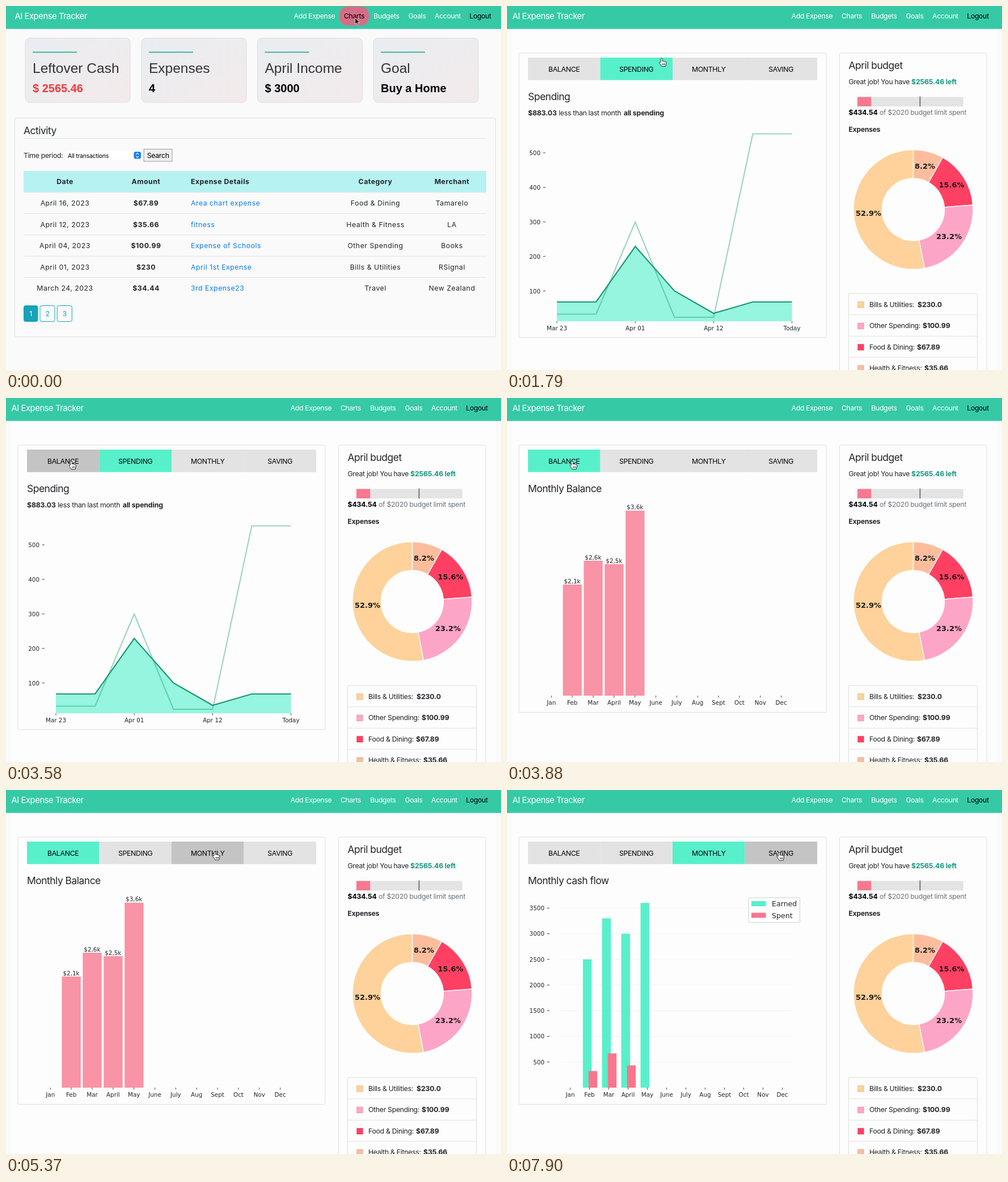
These frames come from a looping animation (873x642 px, 8 s). An HTML page:

```html
<!DOCTYPE html>
<html lang="en">
<head>
<meta charset="utf-8">
<title>AI Expense Tracker</title>
<style>
html, body { margin: 0; width: 100%; height: 100%; overflow: hidden; background: #fafafa; }
svg { display: block; width: 873px; height: 642px; }
text { font: 12.3px Inter, Roboto, sans-serif; letter-spacing: -.025em; fill: #212529; white-space: pre; }
.mid { text-anchor: middle; }
.end { text-anchor: end; }
.b { font-weight: 700; letter-spacing: -.012em; }
.h { font-size: 17.5px; letter-spacing: -.03em; }
.nav text { fill: #fff; letter-spacing: -.03em; }
.nav .brand { font-size: 14.8px; }
.nav .dark, .tab { fill: #000; }
.big { font: 24.5px "Liberation Sans", Arial, sans-serif; letter-spacing: 0; fill: #333; }
.sum { font: bold 20px "Liberation Sans", Arial, sans-serif; letter-spacing: 0; fill: #000; }
.cell { letter-spacing: .5px; }
.link { fill: #0d7bea; }
.plot { font: 10.4px "DejaVu Sans", sans-serif; letter-spacing: 0; }
.key { font: 12.6px "DejaVu Sans", sans-serif; letter-spacing: 0; }
.pct { font: bold 13px "DejaVu Sans", sans-serif; letter-spacing: 0; fill: #1c1a1a; }
.box { fill: none; stroke: #dfdfdf; }
.line { fill: none; stroke: #dee2e6; }
.tick { fill: none; stroke: #333; stroke-width: .9; }
</style>
</head>
<body>
<svg id="stage" viewBox="0 0 873 642"></svg>
<script>
const MINT = '#57f0cb', ROSE = '#f7768d', GREEN = '#1a9873';
const MONTHS = 'Jan Feb Mar April May June July Aug Sept Oct Nov Dec'.split(' ');

const text = (x, y, s, cls = '', extra = '') => `<text x="${x}" y="${y}" class="${cls}" ${extra}>${s.replace(/&/g, '&amp;')}</text>`;
const rect = (x, y, w, h, fill, extra = '') => `<rect x="${x}" y="${y}" width="${w}" height="${h}" fill="${fill}" ${extra}/>`;
const box = (x, y, w, h, r = 2) => `<rect x="${x}" y="${y}" width="${w}" height="${h}" rx="${r}" class="box"/>`;
const path = (d, cls, extra = '') => `<path d="${d}" class="${cls}" ${extra}/>`;
const group = (id, s) => `<g id="${id}">${s}</g>`;
const each = (list, fn) => list.map(fn).join('');

function header() {
  const items = [['Add Expense', 538], ['Charts', 608], ['Budgets', 665], ['Goals', 719], ['Account', 773], ['Logout', 830.5]];
  return rect(0, 0, 873, 40.5, '#36c9a6') + `<g id="nav" class="nav">` +
    rect(582, 1, 52, 33.5, '#d56d87', 'id="pill" rx="14"') +
    text(9.5, 23, 'AI Expense Tracker', 'brand') +
    each(items, ([s, x]) => text(x, 22.4, s, s === 'Logout' ? 'mid dark' : 'mid', `id="${s.replace(' ', '')}"`)) + '</g>';
}

function home() {
  const cards = [[34, 'Leftover Cash', '$ 2565.46'], [239, 'Expenses', '4'], [443.5, 'April Income', '$ 3000'], [648, 'Goal', 'Buy a Home']];
  const rows = [
    ['April 16, 2023', '$67.89', 'Area chart expense', 'Food & Dining', 'Tamarelo'],
    ['April 12, 2023', '$35.66', 'fitness', 'Health & Fitness', 'LA'],
    ['April 04, 2023', '$100.99', 'Expense of Schools', 'Other Spending', 'Books'],
    ['April 01, 2023', '$230', 'April 1st Expense', 'Bills & Utilities', 'RSignal'],
    ['March 24, 2023', '$34.44', '3rd Expense23', 'Travel', 'New Zealand']
  ];
  const cols = [104, 247, 326, 651.5, 786.5];
  const row = (cells, y, head) => each(cells, (s, i) => text(cols[i], y, s,
    (head || i === 1 ? 'b ' : '') + 'cell' + (i === 2 ? (head ? '' : ' link') : ' mid')));
  return each(cards, ([x, name, value], i) =>
      rect(x, 56.5, 185, 113.5, 'url(#card)', 'rx="8" stroke="#dcdde0"') +
      path(`M${x + 13} 81.5h78`, '', 'stroke="#3fb59b" stroke-width="1.8"') +
      text(x + 13, 118, name, 'big') +
      text(x + 13, 151.7, value, 'sum', i ? '' : 'style="fill:#f33a3a"')) +
    box(15.5, 197.5, 848, 386) + text(31, 226, 'Activity', 'h') + path('M31 233.5H847', 'line') +
    text(31, 267.6, 'Time period:') +
    rect(105, 255, 134, 16, '#fff', 'rx="3"') +
    text(109, 267.7, 'All transactions', '', 'style="font-size:10.5px;fill:#000"') +
    rect(225.5, 257, 12.5, 12.5, '#1b7df6', 'rx="3"') +
    path('M229.3 261.8l2.4-2.4 2.4 2.4M229.3 264.8l2.4 2.4 2.4-2.4', '', 'fill="none" stroke="#fff" stroke-width="1.2"') +
    rect(243, 252.5, 50, 21.5, '#efefef', 'stroke="#9a9a9a"') +
    text(268.2, 267.6, 'Search', 'mid', 'style="fill:#000"') +
    rect(31, 291, 816, 37.5, '#b6f2f2') +
    row(['Date', 'Amount', 'Expense Details', 'Category', 'Merchant'], 314.3, true) +
    each(rows, (r, i) => path(`M31 ${328.8 + 37.5 * i}H847`, 'line') + row(r, 352.4 + 37.5 * i)) +
    each([31.5, 60, 90.3], (x, i) => rect(x, 528.5, i ? 26 : 24.5, 28, i ? 'none' : '#17a2b8', 'rx="3" stroke="#17a2b8"') +
      text(x + (i ? 13 : 12.2), 547, `${i + 1}`, 'mid', `style="fill:${i ? '#17a2b8' : '#fff'}"`));
}

function donut() {
  const cx = 716.5, cy = 359, R = 105.5, r = 55;
  const parts = [[8.2, '#fdbd9c', 737, 282], [15.6, '#ff4062', 784, 315.5], [23.2, '#fda5c6', 779.5, 406.5], [53, '#fed29a', 637.5, 365]];
  const at = (p, q) => { const a = p / 50 * Math.PI; return `${cx + q * Math.sin(a)} ${cy - q * Math.cos(a)}`; };
  let sum = 0;
  const slices = each(parts, ([p, fill]) => {
    const a = sum, b = sum += p, big = +(p > 50);
    return path(`M${at(a, R)}A${R} ${R} 0 ${big} 1 ${at(b, R)}L${at(b, r)}A${r} ${r} 0 ${big} 0 ${at(a, r)}Z`, '', `fill="${fill}" stroke="#fdfdfd" stroke-width="1.4"`);
  });
  return slices + each(parts, ([p, , x, y]) => text(x, y + 4.6, (p > 50 ? 52.9 : p) + '%', 'pct mid'));
}

function budget() {
  const list = [['Bills & Utilities:', '$230.0', 724, '#fed29a'], ['Other Spending:', '$100.99', 733, '#fda5c6'],
    ['Food & Dining:', '$67.89', 723, '#ff4062'], ['Health & Fitness:', '$35.66', 736, '#fdbd9c']];
  return box(586.5, 83, 259.5, 600) + text(602.5, 111.3, 'April budget', 'h') +
    text(602.5, 138.3, 'Great job! You have') + text(713, 138.3, '$2565.46 left', 'b', 'style="fill:#17967f"') +
    rect(618, 160.5, 187, 16.5, '#e4e4e4') + rect(618, 160.5, 24.3, 16.5, '#f8788f') + rect(727.7, 159.5, 1.5, 18, '#555') +
    text(602.5, 192, '$434.54', 'b', 'style="fill:#000"') +
    text(657, 192, 'of $2020 budget limit spent', '', 'style="fill:#6c757d"') +
    text(602.5, 222.4, 'Expenses', 'b', 'style="font-size:12px"') + donut() + box(602.5, 507, 227, 180) +
    each(list, ([name, cost, x, fill], i) => {
      const y = 526.3 + 37.5 * i;
      return (i ? path(`M602.5 ${y - 19}H829.5`, 'line') : '') +
        rect(618.5, y - 5, 11, 11, fill, 'stroke="#000" stroke-opacity=".12"') +
        text(639, y + 4.2, name) + text(x, y + 4.2, cost, 'b');
    });
}

const months = (x0, step) => each(MONTHS, (m, i) => {
  const x = x0 + step * i;
  return path(`M${x} 525v3.5`, 'tick') + text(x, 541, m, 'plot mid');
});

function spending() {
  const line = ys => 'M' + ys.map((y, i) => `${88 + 69.1 * i} ${y}`).join('L');
  const now = line([522, 522, 424, 502.5, 542, 522, 522]);
  const last = line([543.5, 543.5, 381, 549, 549, 225.5, 225.5]);
  return box(21, 83, 542, 502) + text(37, 166.4, 'Spending', 'h') +
    text(37, 193.3, '$883.03', 'b') + text(91.2, 193.3, 'less than last month') + text(205.7, 193.3, 'all spending', 'b') +
    each([500, 400, 300, 200, 100], (n, i) => {
      const y = 259 + 60.9 * i;
      return text(59, y + 3.9, `${n}`, 'plot end') + path(`M63.5 ${y}h4.5`, 'tick');
    }) +
    path(`${now}V556H88Z`, '', `fill="${MINT}" fill-opacity=".62"`) +
    path(last, '', `fill="none" stroke="${GREEN}" stroke-opacity=".42" stroke-width="2.1"`) +
    path(now, '', `fill="none" stroke="${GREEN}" stroke-width="2.2"`) +
    each(['Mar 23', 'Apr 01', 'Apr 12', 'Today'], (s, i) => path(`M${88 + 138.2 * i} 556v3.5`, 'tick') + text(88 + 138.2 * i, 571.5, s, 'plot mid'));
}

function balance() {
  const bars = [[329, '$2,1k'], [287, '$2,6k'], [293, '$2,5k'], [198.7, '$3,6k']];
  return box(21, 83, 542, 471.5) + text(37, 166.4, 'Monthly Balance', 'h') +
    each(bars, ([y, s], i) => rect(98.5 + 36.9 * i, y, 33.3, 525 - y, '#f993a6') + text(115 + 36.9 * i, y - 2.5, s, 'plot mid')) +
    months(78.3, 36.85);
}

function monthly() {
  const k = .0905;
  const bar = (x, v, fill) => rect(x, 525 - v * k, 15.4, v * k, fill);
  const keys = [['Earned', MINT], ['Spent', ROSE]];
  return box(21, 83, 542, 471.5) + text(37, 166.4, 'Monthly cash flow', 'h') +
    each([500, 1000, 1500, 2000, 2500, 3000, 3500], n => {
      const y = 525 - n * k;
      return path(`M95 ${y}H502`, '', 'stroke="#f1f1f1"') + text(66, y + 3.9, `${n}`, 'plot end') + path(`M70.5 ${y}h4.5`, 'tick');
    }) +
    each([2500, 3300, 3000, 3600], (v, i) => bar(133.8 + 33.9 * i, v, MINT)) +
    each([325, 668, 434.54], (v, i) => bar(143.7 + 34 * i, v, ROSE)) + months(111.5, 34) +
    rect(426, 190, 90.5, 43.5, '#fff', 'rx="2.5" stroke="#ccc"') +
    each(keys, ([s, fill], i) => rect(431, 196 + 20.5 * i, 25.5, 9, fill) + text(467, 205 + 20.5 * i, s, 'key'));
}

const tabs = () => each(['BALANCE', 'SPENDING', 'MONTHLY', 'SAVING'], (s, i) =>
  rect(37 + 127.5 * i, 91, 127.6, 39.7, '#e3e3e3', `id="tab${i}"`) + text(100.7 + 127.5 * i, 115.5, s, 'tab mid'));

const $ = id => document.getElementById(id);
$('stage').innerHTML =
  `<defs><linearGradient id="card" x1="0" y1="0" x2="1" y2="1"><stop offset="0" stop-color="#e9edf1"/><stop offset="1" stop-color="#f3eaeb"/></linearGradient></defs>` +
  rect(0, 0, 873, 642, '#fafafa') + group('home', home()) +
  group('charts', rect(9, 40, 855, 602, '#fdfdfd') + group('view0', balance()) + group('view1', spending()) + group('view2', monthly()) + tabs() + budget()) +
  header() +
  `<g id="cursor">` +
  path('M0 0V11L2.6 8.7 4.3 12.6 6 11.9 4.4 8H8Z', '', 'id="arrow" fill="#000" stroke="#fff" stroke-width=".8"') +
  path('M-1.6 7V1.2a1.5 1.5 0 0 1 3 0V5.2c.3-1 2.4-1 2.6.4 .5-.9 2.2-.6 2.4.6 .6-.7 1.9-.3 1.9 1V10c0 1.6-1 2.4-1.2 4.2H.2C-.4 12.2-2 11-3.6 8.6c-.8-1.3.6-2.5 2-1.6Z M2 9v3M4 9v3M6 9v3', '', 'id="hand" fill="#fff" stroke="#111" stroke-width=".9" stroke-linejoin="round"') + '</g>';

// first change, last change, steps, end point
const MOVES = [
  [1050, 2080, 8, 209, 113], [2230, 2380, 2, 116, 111], [2530, 2680, 2, 221, 111],
  [3280, 3580, 3, 115, 111.5], [4780, 5370, 5, 368.5, 109], [7460, 7900, 4, 480, 110]
];

function pointer(t) {
  let x = 615.7, y = 21;
  for (const [from, to, n, ex, ey] of MOVES) {
    if (t < from) break;
    const p = Math.min(1, (Math.floor((t - from) / ((to - from) / (n - 1)) + .001) + 1) / n);
    const e = p * p * (3 - 2 * p);
    x += (ex - x) * e;
    y += (ey - y) * e ** 1.5;
  }
  return [x, y];
}

const show = (id, on) => $(id).setAttribute('display', on ? 'inline' : 'none');

function draw(t) {
  const first = t < 150;
  const active = t < 3880 ? 1 : t < 6270 ? 0 : 2;
  const [x, y] = pointer(t);
  const over = !first && y >= 91 && y < 131 ? Math.floor((x - 37) / 127.5) : -1;
  show('home', first);
  show('charts', !first);
  show('pill', first);
  $('nav').setAttribute('transform', `translate(${first ? 6 : 0})`);
  $('Charts').classList.toggle('dark', first);
  for (let i = 0; i < 4; i++) {
    if (i < 3) show('view' + i, i === active);
    $('tab' + i).setAttribute('fill', i === active ? MINT : i === over ? '#c4c4c4' : '#e3e3e3');
  }
  show('hand', over >= 0);
  show('arrow', over < 0);
  $('cursor').setAttribute('transform', `translate(${x} ${y})`);
}

function tick() {
  draw(performance.now() % 8000);
  requestAnimationFrame(tick);
}
tick();
</script>
</body>
</html>
```
